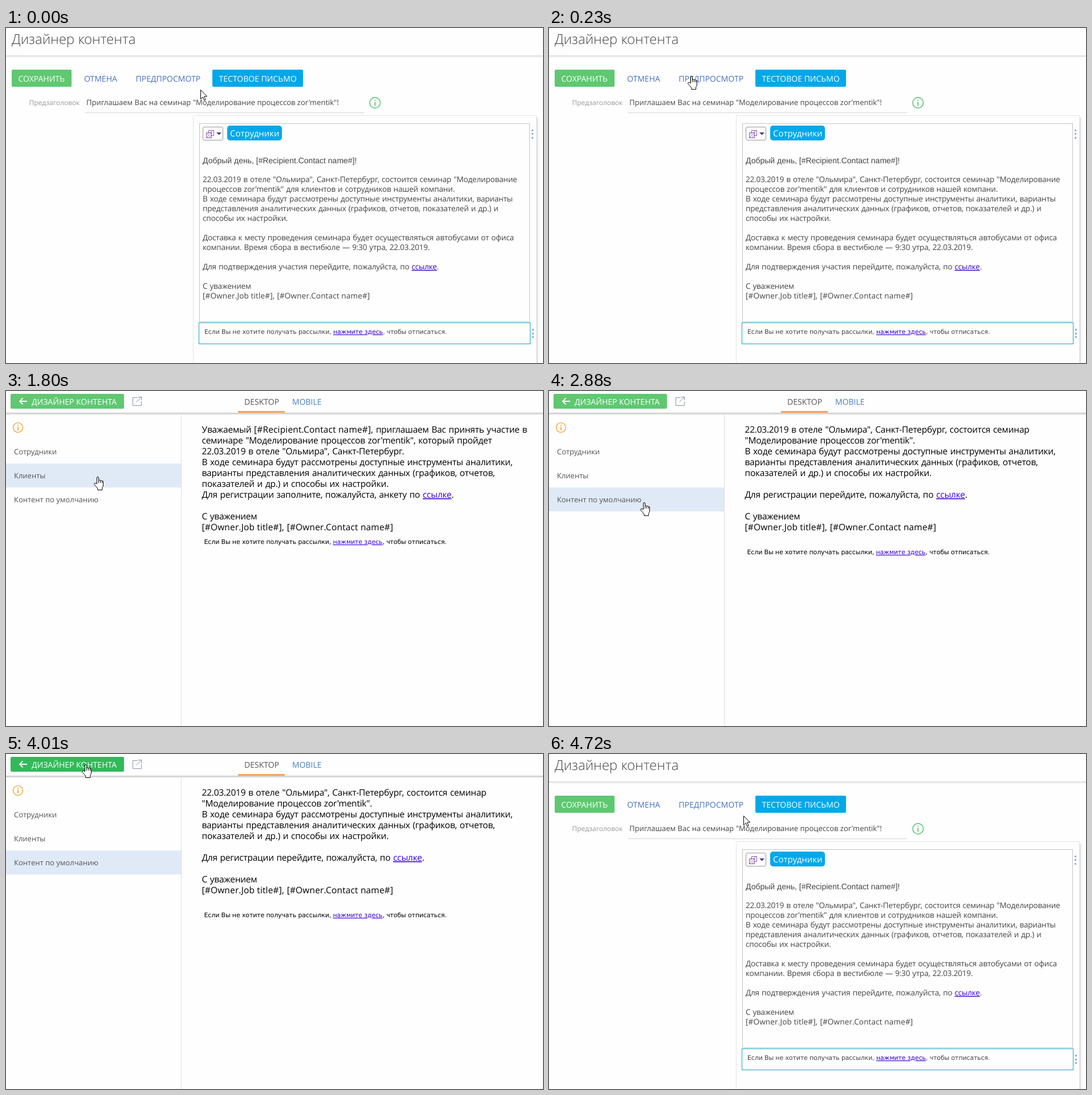
Write an HTML page that moves like this. It is 942 px wide and 587 px high and loops after 5180 ms.

```html
<!DOCTYPE html>
<html lang="ru">
<head>
<meta charset="utf-8">
<title>Дизайнер контента</title>
<style>
html, body { margin: 0; height: 100%; overflow: hidden; background: #fefefe; }
svg { display: block; width: 942px; height: 587px; }
text { font: 14px "Open Sans", "Noto Sans", sans-serif; text-rendering: geometricPrecision; }
.s13 { font-size: 13px; }
.s12 { font-size: 12px; }
.w { fill: #fff; }
.body { letter-spacing: -.015em; word-spacing: .06em; }
.tag { letter-spacing: .01em; word-spacing: 0; }
.hello { font-family: "Liberation Sans", Arial, sans-serif; }
.note { font: 11px "DejaVu Sans", Verdana, sans-serif; letter-spacing: -.13px; }
.link { fill: #3300cc; text-decoration: underline; }
.line { fill: none; }
#editor .mail { fill: #444; }
#editor .body { font-size: 13.56px; }
#preview .body { font-size: 15.5px; }
#preview .hello { font-size: 16px; }
#preview .link { fill: #3a00e0; }
</style>
</head>
<body>
<svg viewBox="0 0 942 587">
  <defs>
    <linearGradient id="fade" x2="0" y2="1">
      <stop stop-color="#c4c4c4"/><stop offset="1" stop-color="#fefefe"/>
    </linearGradient>
    <linearGradient id="side">
      <stop stop-color="#d2d2d2"/><stop offset="1" stop-color="#fefefe"/>
    </linearGradient>
  </defs>

  <g id="editor">
    <text x="10" y="28" fill="#444" style="font-size:24px;font-weight:300">Дизайнер контента</text>
    <rect y="48" width="942" height="4" fill="url(#fade)" opacity=".65"/>
    <rect x="10" y="73" width="105" height="30" rx="2" fill="#5fc870"/>
    <text class="w" x="21.5" y="94">СОХРАНИТЬ</text>
    <text x="137" y="94" fill="#4671c2">ОТМЕНА</text>
    <text x="227.5" y="94" fill="#4671c2">ПРЕДПРОСМОТР</text>
    <rect x="362" y="73" width="159" height="30" rx="2" fill="#00a8ea"/>
    <text class="w" x="373.5" y="94">ТЕСТОВОЕ ПИСЬМО</text>
    <text class="s12" x="40.5" y="135" fill="#999">Предзаголовок</text>
    <text class="s13" x="141" y="135" fill="#444">Приглашаем Вас на семинар "Моделирование процессов zor'mentik"!</text>
    <path d="M139 148.5H629" stroke="#aaa" stroke-dasharray="1 1"/>
    <g transform="translate(647.3 131)" stroke="#55c272" fill="#55c272">
      <circle class="line" r="9.3" stroke-width="1.5"/>
      <path d="M0-1.5V5" stroke-width="1.8"/><circle cy="-4.3" r=".6"/>
    </g>

    <rect x="930" y="157" width="5" height="430" fill="url(#side)"/>
    <path d="M328.5 587V153.5H930.5V587" fill="#fefefe" stroke="#e4e4e4"/>
    <rect class="line" x="339.5" y="167.5" width="579" height="347" stroke="#888" stroke-dasharray="1 1"/>
    <rect x="345.5" y="173.5" width="35" height="23" rx="2.5" fill="#fff" stroke="#999"/>
    <g class="line" stroke="#8e5bb5">
      <path d="M355.5 183V179.5H364.5V188.5H361"/>
      <rect x="351.5" y="183.5" width="9" height="9"/>
      <path d="M352 187.5l4-4M352 192l8-8M356 192l4-4M359 183l5-4"/>
    </g>
    <path d="M369 183h9l-4.5 4.5z" fill="#46427c"/>
    <rect x="388" y="171" width="96" height="26" rx="5" fill="#00a8ea"/>
    <text class="w" x="393" y="190" style="font-size:15px">Сотрудники</text>
    <g fill="#8bb2da">
      <path d="M922 178h3v3h-3zm0 6h3v3h-3zm0 7h3v3h-3z"/>
      <path d="M923 527h3v3h-3zm0 7h3v3h-3zm0 6h3v3h-3z"/>
    </g>
    <rect class="line" x="338.5" y="516.5" width="581" height="37" stroke="#16a5c6"/>
    <g id="letter" class="mail"></g>
  </g>

  <g id="preview">
    <rect id="back" x="8" y="5" width="199" height="26" rx="2"/>
    <path class="line" d="M24 18H37M29.5 12.5L24 18L29.5 23.5" stroke="#fff" stroke-width="1.8"/>
    <text class="w" x="45" y="24">ДИЗАЙНЕР КОНТЕНТА</text>
    <path class="line" d="M231 11.5H222.5V25.5H237.5V18M228.5 19.5L237.5 10.5M232 10.5H237.5V16" stroke="#8494b8"/>
    <text x="418" y="24" fill="#555">DESKTOP</text>
    <text x="502" y="24" fill="#467fc0">MOBILE</text>
    <rect y="38" width="942" height="4.5" fill="url(#fade)"/>
    <rect x="407" y="35" width="82" height="3" fill="#f6a45c"/>
    <path d="M307.5 42V587" stroke="#ddd"/>
    <g transform="translate(21 64)" stroke="#f3a12f" fill="#f3a12f">
      <circle class="line" r="8.4" stroke-width="1.4"/>
      <path d="M0-1.5V5" stroke-width="1.7"/><circle cy="-4" r=".6"/>
    </g>
    <rect id="row" width="307" height="42" fill="#e0eaf7"/>
    <g fill="#555">
      <text class="s13" x="14" y="111">Сотрудники</text>
      <text class="s13" x="14" y="153">Клиенты</text>
      <text class="s13" x="14" y="195">Контент по умолчанию</text>
    </g>
    <g class="mail"></g>
    <g class="mail"></g>
    <g class="mail"></g>
  </g>

  <path id="arrow" d="M341.5 108.5v16l3.7-3.5 2.6 5.8 2.4-1-2.6-5.9h5z" fill="#fff" stroke="#000"/>
  <g id="hand" fill="#fff" stroke="#000">
    <path d="M5.5 12.5V2a1.5 1.5 0 0 1 3 0V6.5q1.5-1.2 3 .3 1.6-.9 3 .6 2-.4 2 1.6V15q0 2.3-1.8 4.5V23.5H6.9V21Q4.5 17.5.6 13.4.8 10.6 3 11.4z"/>
    <path class="line" d="M8.5 6.5V11M11.5 7V11M14.5 8V11"/>
  </g>
</svg>
<script>
const $ = id => document.getElementById(id);

const link = s => s.replace(/\{(.*?)\}/g, '<tspan class="link">$1</tspan>');
const tags = s => s.replace(/\[#.*?#\],?/g, '<tspan class="tag">$&</tspan>');
const row = (cls, x, y, s) => `<text class="${cls}" x="${x}" y="${y}">${link(s)}</text>`;
const lines = (x, y, step, text) => text.split('\n')
  .map((s, i) => s && row('body', x, y + i * step, tags(s))).join('');
const note = (x, y) =>
  row('note', x, y, 'Если Вы не хотите получать рассылки, {нажмите здесь}, чтобы отписаться.');

const hello = 'Добрый день, [#Recipient.Contact name#]!';
const place = '22.03.2019 в отеле "Ольмира", Санкт-Петербург';
const title = `"Моделирование процессов zor'mentik"`;
const sign = 'С уважением\n[#Owner.Job title#], [#Owner.Contact name#]';
const tools = `В ходе семинара будут рассмотрены доступные инструменты аналитики,
варианты представления аналитических данных (графиков, отчетов,
показателей и др.) и способы их настройки.`;

$('letter').innerHTML = row('hello', 345, 237, hello) + lines(345, 270, 17,
`${place}, состоится семинар ${title.replace(' ', '\n')} для клиентов и сотрудников нашей компани.
В ходе семинара будут рассмотрены доступные инструменты аналитики, варианты
представления аналитических данных (графиков, отчетов, показателей и др.) и
способы их настройки.

Доставка к месту проведения семинара будет осуществляться автобусами от офиса
компании. Время сбора в вестибюле — 9:30 утра, 22.03.2019.

Для подтверждения участия перейдите, пожалуйста, по {ссылке}.

${sign}`) + note(348, 536);

const mails = document.querySelectorAll('#preview .mail');

mails[0].innerHTML = row('hello', 343, 71, hello) + lines(343.5, 109, 19,
`${place}, состоится семинар
${title} для клиентов и сотрудников нашей
компани.
${tools}

Доставка к месту проведения семинара будет осуществляться автобусами
от офиса компании. Время сбора в вестибюле — 9:30 утра, 22.03.2019.

Для подтверждения участия перейдите, пожалуйста, по {ссылке}.

${sign}`) + note(347.5, 398);

mails[1].innerHTML = lines(343.5, 73, 19,
`Уважаемый [#Recipient.Contact name#], приглашаем Вас принять участие в
семинаре ${title}, который пройдет
${place}.
${tools}
Для регистрации заполните, пожалуйста, анкету по {ссылке}.

${sign}`) + note(347.5, 268);

mails[2].innerHTML = lines(343.5, 73, 19,
`${place}, состоится семинар
${title}.
${tools}

Для регистрации перейдите, пожалуйста, по {ссылке}.

${sign}`) + note(347.5, 286);

// start time, mail index (-1: editor), hand position, back button colour
const green = '#5fc870';
const steps = [
  [0, -1],
  [230, -1, [243, 84]],
  [830, 0, [167, 104], green],
  [1800, 1, [154, 150], green],
  [2880, 2, [160, 195], green],
  [3910, 2, [133, 18], '#49c064'],
  [4010, 2, [133, 18], '#32b95a'],
  [4720, -1]
];

const show = (el, on) => { el.style.display = on ? '' : 'none'; };

function draw(now) {
  const t = Math.max(0, now - start) % 5180;
  const [, mail, hand, color] = steps.findLast(s => s[0] <= t);
  show($('editor'), mail < 0);
  show($('preview'), mail >= 0);
  show($('arrow'), !hand);
  show($('hand'), hand);
  if (hand) $('hand').setAttribute('transform', `translate(${hand})`);
  if (mail >= 0) {
    mails.forEach((el, i) => show(el, i === mail));
    $('row').setAttribute('y', 85 + 42 * mail);
    $('back').setAttribute('fill', color);
  }
  requestAnimationFrame(draw);
}

const start = performance.now();
draw(start);
</script>
</body>
</html>
```
